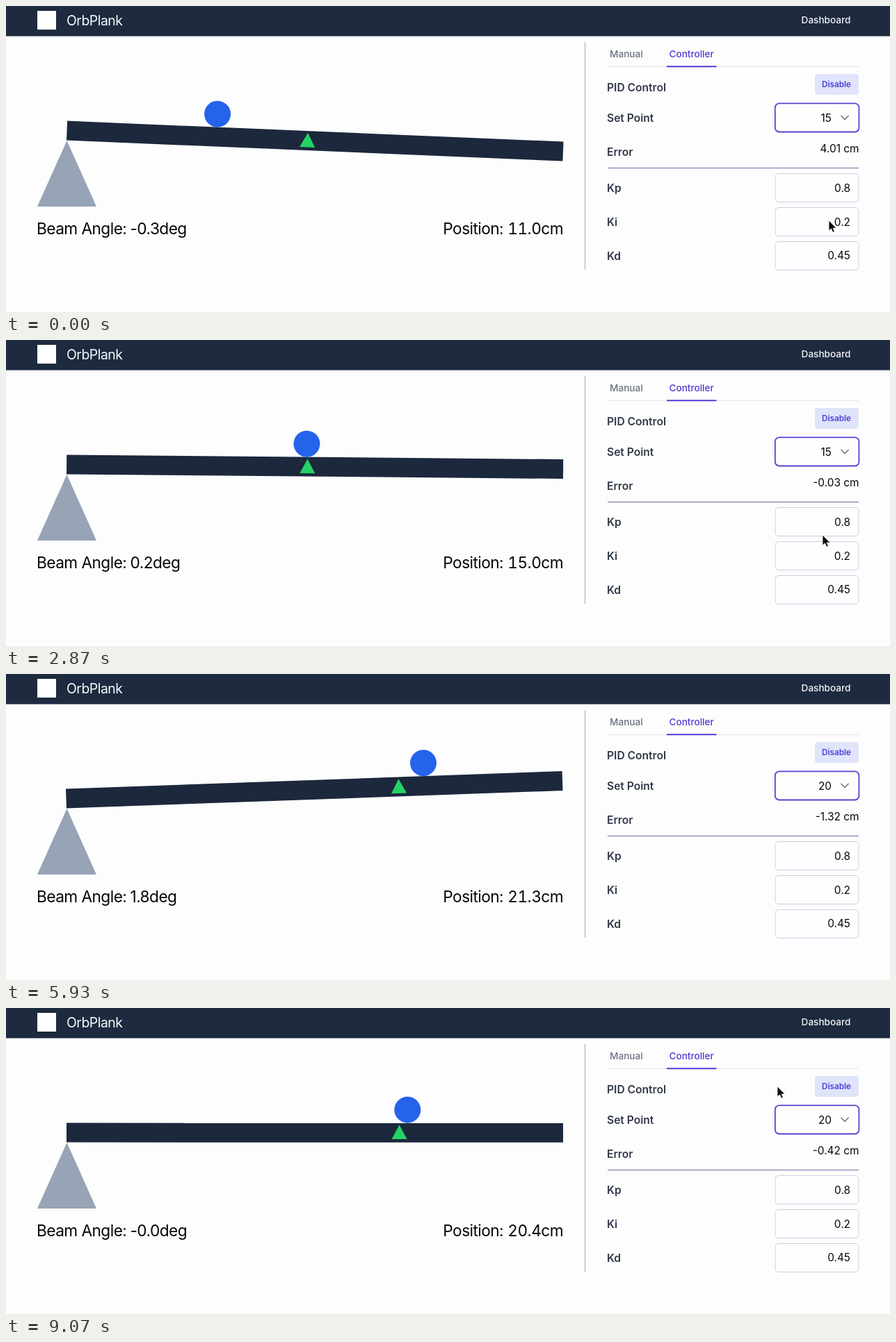
Recreate the animation shown at these times as an HTML page. Size 1271 by 441 pixels, loop 9.13 s.

```html
<!DOCTYPE html>
<html lang="en">
<head>
<meta charset="utf-8">
<title>OrbPlank</title>
<style>
  html, body { margin: 0; width: 100%; height: 100%; overflow: hidden; background: #fdfdfd; }
  svg { display: block; width: 1271px; height: 441px; font-family: Inter, "Open Sans", sans-serif; }
  .end { text-anchor: end; }
  .nav { font-size: 13.6px; font-weight: 500; }
  .brand { font-size: 19.4px; letter-spacing: -.025em; fill: #f8fafc; }
  .label { font-size: 15.6px; font-weight: 600; fill: #303848; }
  .value { font-size: 15.4px; fill: #08080c; }
  .big { font-size: 22.7px; letter-spacing: -.025em; fill: #050508; }
  .even { font-variant-numeric: tabular-nums; }
  .field { fill: #fefefe; stroke: #cdcde6; }
  .accent { fill: #4f3bd6; }
</style>
</head>
<body>
<svg viewBox="0 0 1271 441">
  <rect width="1271" height="441" fill="#fdfdfd"/>
  <rect width="1271" height="43.5" fill="#1d2a3f"/>
  <rect x="45" y="7" width="27" height="27" fill="#fff"/>
  <text class="brand" x="87" y="27.5">OrbPlank</text>
  <text class="nav end" x="1214.5" y="25.3" fill="#f3f4f6">Dashboard</text>

  <path d="M87.5 194 L130 289 H45 Z" fill="#96a4b6"/>
  <g id="beam">
    <rect x="87" y="165.6" width="714" height="28" fill="#1c283c"/>
    <path id="mark" d="M0 168.3 L11 189 H-11 Z" fill="#25d265"/>
    <circle id="ball" cy="146.6" r="19" fill="#2563eb"/>
  </g>
  <text class="big" x="44" y="329">Beam Angle:</text>
  <text class="big" x="178.5" y="329" id="angle"></text>
  <text class="big" x="628.3" y="329">Position:</text>
  <text class="big even end" x="801" y="329" id="pos"></text>

  <path d="M832.5 52 V380" stroke="#a0aabd"/>
  <text class="nav" x="868" y="74" fill="#6b7280">Manual</text>
  <text class="nav accent" x="953.5" y="74">Controller</text>
  <path d="M865 87.5 H1226" stroke="#e3e5ee"/>
  <path d="M950 87.2 H1021.5" stroke="#4f3bd6" stroke-width="2"/>

  <text class="label" x="864" y="122.7">PID Control</text>
  <rect x="1163" y="98" width="63" height="30" rx="4" fill="#dfe4fa"/>
  <text class="accent" x="1173" y="117.2" font-size="11.7" font-weight="600">Disable</text>

  <text class="label" x="864" y="166.7">Set Point</text>
  <rect x="1105.8" y="140.3" width="120.6" height="41.2" rx="6" fill="#fefefe" stroke="#5343d4" stroke-width="1.8"/>
  <text class="value end" x="1187" y="166.7" id="set"></text>
  <path d="M1200.8 158.3 L1206 163.5 L1211.2 158.3" fill="none" stroke="#6b7280" stroke-width="1.5" stroke-linecap="round" stroke-linejoin="round"/>

  <text class="label" x="864" y="215.5">Error</text>
  <text class="value end" x="1226.5" y="211.3" id="error"></text>
  <path d="M865 233.5 H1226" stroke="#8e92b8" stroke-width="1.4"/>

  <text class="label" x="864" y="268.3">Kp</text>
  <rect class="field" x="1106" y="241.5" width="120" height="41" rx="5"/>
  <text class="value end" x="1214" y="268">0.8</text>
  <text class="label" x="864" y="317">Ki</text>
  <rect class="field" x="1106" y="290.5" width="120" height="41" rx="5"/>
  <text class="value end" x="1214" y="316.8">0.2</text>
  <text class="label" x="864" y="365.6">Kd</text>
  <rect class="field" x="1106" y="339.5" width="120" height="41" rx="5"/>
  <text class="value end" x="1214" y="365.4">0.45</text>

  <path id="cursor" d="M0 0 V15 L3.4 11.9 L5.8 17.2 L8.4 16.1 L6.1 11.1 H10.8 Z" fill="#0a0a0a" stroke="#fff" stroke-width=".8"/>
</svg>
<script>
  const LOOP = 9130, LAG = 150, STEP = 40;
  const PICK = 4400, REACT = 4430;  // new set point chosen, controller responds

  // Pointer stops: time, x, y
  const stops = [
    [0, 1183, 309], [2500, 1182, 309], [2870, 1174, 281], [3500, 1186, 162],
    [3900, 1186, 162], [4430, 1076, 363], [4620, 1060, 445],
    [7900, 1130, 445], [9070, 1109, 113]
  ];

  const ui = {};
  for (const el of document.querySelectorAll("[id]")) ui[el.id] = el;

  const ease = x => {
    const u = Math.min(1, Math.max(0, x));
    return u * u * (3 - 2 * u);
  };
  const mix = (a, b, k) => a + (b - a) * k;
  const decay = (t, tau) => Math.exp(-t / tau);
  const wave = (t, period) => Math.sin(2 * Math.PI * t / period);

  // Ball position in cm: a rise plus ringing, then a rise plus slow overshoot
  function position(t) {
    const s = t - REACT;
    if (s > 0) return 20 + 2.245 * decay(s, 2770) - 7.215 * (1 - ease(s / 952));
    const rise = 5.487 * (1 - ease((t + 338) / 1000));
    const ring = 5.2 * ease(t / 600) * decay(t, 718) * wave(t - 340, 1250);
    return 15.02 - rise + ring;
  }

  // Beam angle in degrees: ringing that settles, then a kick and a long brake
  function tilt(t) {
    const s = t - REACT;
    const settle = 1 - ease((t - 2870) / 1200);
    const ring = 3.15 * settle * decay(t, 2700) * wave(t + 8, 1375) - .4;
    if (s <= 0) return ring;
    const kick = 10.6 * decay(s, 838) * (1 - 1.6 * (1 - ease(s / 800))) - .06;
    return mix(ring, kick, ease(s / 120));
  }

  function pointer(t) {
    const i = stops.findIndex(p => p[0] > t);
    if (i < 0) return stops[stops.length - 1].slice(1);
    const [t0, x0, y0] = stops[i - 1], [t1, x1, y1] = stops[i];
    const k = ease((t - t0) / (t1 - t0));
    return [mix(x0, x1, k), mix(y0, y1, k)];
  }

  const toX = cm => 433.3 + (cm - 15) * 26.45;
  const write = (el, s) => { if (el.textContent !== s) el.textContent = s; };
  const place = (el, s) => el.setAttribute("transform", s);

  function draw(t) {
    const seen = t - LAG;  // the drawing trails the readings
    const sample = Math.max(0, Math.floor((t - 30) / STEP) * STEP + 30);
    const pos = position(sample);
    const goal = sample > REACT ? 20 : 15;

    place(ui.beam, `rotate(${-tilt(seen)} 87 193.6)`);
    place(ui.mark, `translate(${toX(mix(15, 20, ease((t - REACT) / 300)))} 0)`);
    place(ui.cursor, `translate(${pointer(t)})`);
    ui.ball.setAttribute("cx", toX(position(seen)));

    write(ui.angle, tilt(sample).toFixed(1) + "deg");
    write(ui.pos, pos.toFixed(1) + "cm");
    write(ui.set, t < PICK ? "15" : "20");
    write(ui.error, (goal - pos).toFixed(2) + " cm");
  }

  const start = performance.now();
  function tick() {
    draw((performance.now() - start) % LOOP);
    requestAnimationFrame(tick);
  }
  draw(0);
  requestAnimationFrame(tick);
</script>
</body>
</html>
```
